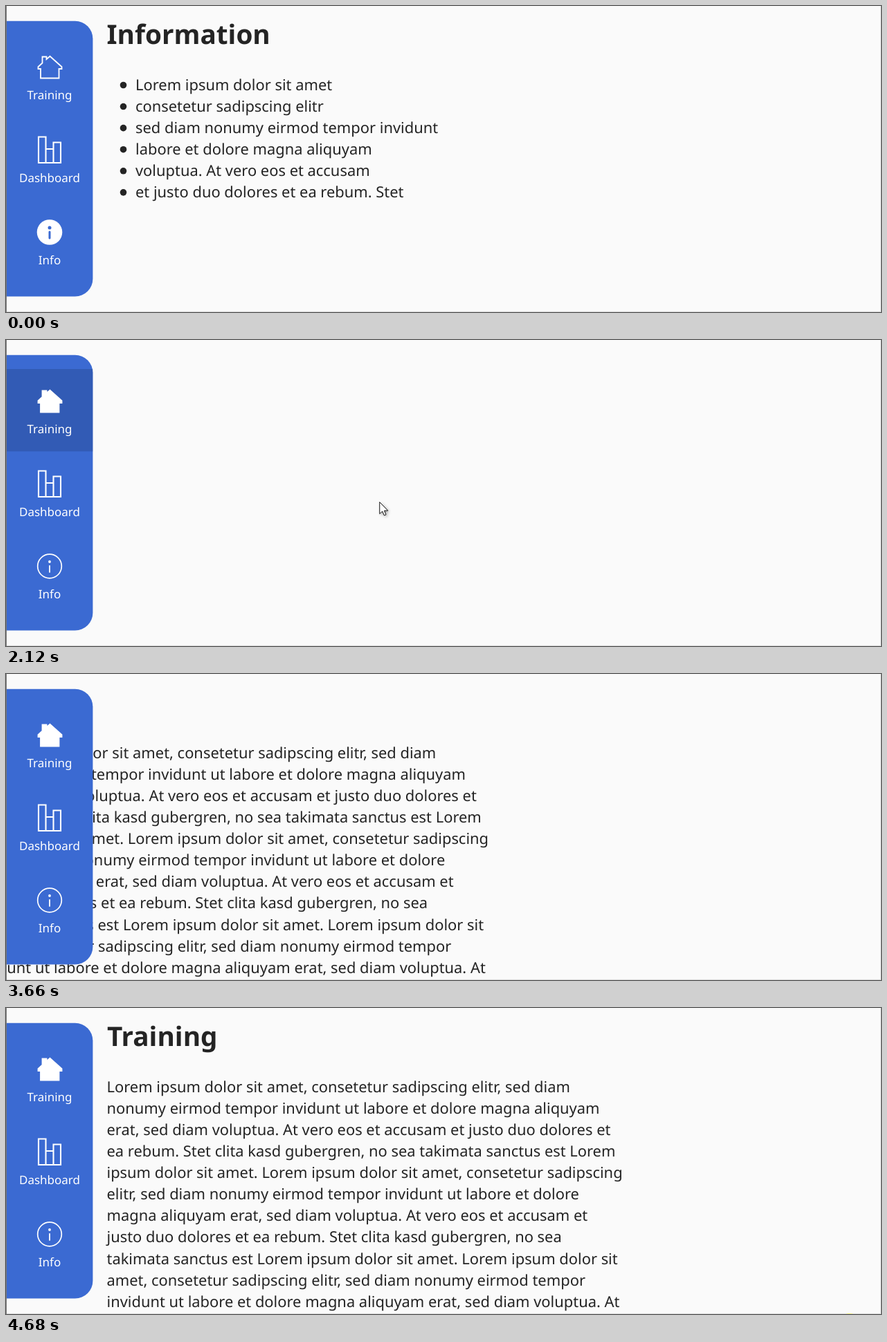
Animation of 1264 by 443 pixels, one loop 4.77 s. Source, as an HTML page with a canvas:

```html
<!DOCTYPE html>
<html lang="en">
<head>
<meta charset="utf-8">
<title>Sliding pages</title>
<style>
html, body { margin: 0; width: 100%; height: 100%; overflow: hidden; background: #fafafa; }
canvas { display: block; }
</style>
</head>
<body>
<canvas id="stage" width="1264" height="443"></canvas>
<script>
const ctx = document.getElementById('stage').getContext('2d');
const W = 1264, H = 443, LOOP = 4770;
const BLUE = '#3b6ad2', DARK = [34, 63, 124], INK = '#242424', CLICK = 'rgba(255,255,0,.47)';
const FONT = '"Noto Sans", "Open Sans", sans-serif';
const TITLE = 38.7, BODY = 21.9, LABEL = 17;
const SWAP = 1450, ENTER = 2782, SETTLED = 4280, TRAVEL = 952;
const HOME = [59, 83];

const facts = [
  'Lorem ipsum dolor sit amet',
  'consetetur sadipscing elitr',
  'sed diam nonumy eirmod tempor invidunt',
  'labore et dolore magna aliquyam',
  'voluptua. At vero eos et accusam',
  'et justo duo dolores et ea rebum. Stet'
];
const lesson = [
  'Lorem ipsum dolor sit amet, consetetur sadipscing elitr, sed diam',
  'nonumy eirmod tempor invidunt ut labore et dolore magna aliquyam',
  'erat, sed diam voluptua. At vero eos et accusam et justo duo dolores et',
  'ea rebum. Stet clita kasd gubergren, no sea takimata sanctus est Lorem',
  'ipsum dolor sit amet. Lorem ipsum dolor sit amet, consetetur sadipscing',
  'elitr, sed diam nonumy eirmod tempor invidunt ut labore et dolore',
  'magna aliquyam erat, sed diam voluptua. At vero eos et accusam et',
  'justo duo dolores et ea rebum. Stet clita kasd gubergren, no sea',
  'takimata sanctus est Lorem ipsum dolor sit amet. Lorem ipsum dolor sit',
  'amet, consetetur sadipscing elitr, sed diam nonumy eirmod tempor',
  'invidunt ut labore et dolore magna aliquyam erat, sed diam voluptua. At'
];

const house = new Path2D('M46.5 88 L52.5 82.5 V73.5 H58.5 V77 L63.5 72.8 L80.5 88 V91 H76.5 V104.5 H50 V91 H46.5 Z');
const bars = new Path2D('M47 189.5 H57.5 V227 H47 Z M57.5 207 H68.5 V227 H57.5 Z M68.5 197.5 H79 V227 H68.5 Z');
const arrow = new Path2D('M0 0 V17 L4 13.3 L6.6 19.3 L9.2 18.2 L6.7 12.4 H12 Z');
const hand = new Path2D('M-2 1.5 Q0 -1.2 2.2 1.5 V9 Q5 7.6 6.2 9.8 Q9 8.7 9.9 11.2 Q13 10.7 13 14 V18 Q12.6 21.5 10.5 25.5 H0.5 Q-1 21.5 -4 18.6 Q-7.4 14.6 -6 12.8 Q-4.3 11.3 -2 14.2 Z');
const fingers = new Path2D('M2.2 9 V14 M6.2 10 V14.5 M9.9 11.5 V15');

const clamp = v => Math.max(0, Math.min(1, v));
const smooth = v => { v = clamp(v); return v * v * (3 - 2 * v); };

function text(str, x, y, size, color, weight = 400) {
  ctx.font = `${weight} ${size}px ${FONT}`;
  ctx.fillStyle = color;
  ctx.fillText(str, x, y);
}

function disc(x, y, r, color) {
  ctx.fillStyle = color;
  ctx.beginPath();
  ctx.arc(x, y, r, 0, Math.PI * 2);
  ctx.fill();
}

const rowY = i => 122 + i * 31.07;

function drawInfoPage() {
  text('Information', 145.5, 55, TITLE, INK, 700);
  facts.forEach((line, i) => {
    disc(169.5, rowY(i) - 7.5, 4.8, INK);
    text(line, 187, rowY(i), BODY, INK);
  });
}

function drawTrainingPage(dx) {
  text('Training', 146 + dx, 55, TITLE, INK, 700);
  lesson.forEach((line, i) => text(line, 145.5 + dx, rowY(i), BODY, INK));
}

function pageOffset(t) {
  if (t < ENTER) return -Math.pow(0.2137 * Math.max(0, t - 1424), 1.4);
  const u = clamp((t - ENTER) / (SETTLED - ENTER));
  return -TRAVEL * (1 - Math.sin(u * Math.PI / 2));
}

function drawSidebar(onTraining, hover) {
  ctx.fillStyle = BLUE;
  ctx.beginPath();
  ctx.roundRect(0, 21.7, 125.4, 398.8, [0, 25.5, 25.5, 0]);
  ctx.fill();
  if (hover > 0) {
    ctx.fillStyle = `rgba(${DARK},${hover})`;
    ctx.fillRect(0, 42, 125.4, 119.3);
  }

  ctx.strokeStyle = ctx.fillStyle = '#fff';
  ctx.lineWidth = 1.8;
  if (onTraining) ctx.fill(house);
  ctx.stroke(house);
  ctx.lineWidth = 2.1;
  ctx.stroke(bars);

  if (onTraining) {
    ctx.lineWidth = 1.7;
    ctx.beginPath();
    ctx.arc(63, 327.5, 17.3, 0, Math.PI * 2);
    ctx.stroke();
  } else {
    disc(63, 327.5, 18.3, '#fff');
  }
  const mark = onTraining ? '#fff' : BLUE;
  disc(63, 321, onTraining ? 1.9 : 2.5, mark);
  ctx.strokeStyle = mark;
  ctx.lineWidth = onTraining ? 1.8 : 3;
  ctx.lineCap = 'round';
  ctx.beginPath();
  ctx.moveTo(63, 327);
  ctx.lineTo(63, 336);
  ctx.stroke();
  ctx.lineCap = 'butt';

  ctx.textAlign = 'center';
  ['Training', 'Dashboard', 'Info'].forEach((s, i) => text(s, 63, 135.3 + i * 119.2, LABEL, '#fff'));
  ctx.textAlign = 'left';
}

function pointer(t) {
  const move = (a, b, u) => a.map((v, i) => v + (b[i] - v) * smooth(u));
  if (t < 260 || t >= 2410) return null;
  if (t < 1900) return move([1077, 430], HOME, (t - 250) / 550);
  return move(HOME, [1178, 436], (t - 1890) / 510);
}

function drawPointer([x, y]) {
  const isHand = x < 125;
  const shape = isHand ? hand : arrow;
  ctx.save();
  ctx.translate(x, y);
  ctx.save();
  ctx.shadowColor = 'rgba(0,0,0,.4)';
  ctx.shadowBlur = 4;
  ctx.shadowOffsetX = ctx.shadowOffsetY = 2;
  ctx.fillStyle = '#fff';
  ctx.fill(shape);
  ctx.restore();
  ctx.strokeStyle = '#111';
  ctx.lineWidth = 1;
  ctx.stroke(shape);
  if (isHand) ctx.stroke(fingers);
  ctx.restore();
}

function draw(t) {
  const onTraining = t >= SWAP;
  ctx.textRendering = 'geometricPrecision';
  ctx.fillStyle = '#fafafa';
  ctx.fillRect(0, 0, W, H);

  if (onTraining) drawTrainingPage(pageOffset(t));
  else drawInfoPage();

  const hover = smooth((t - 690) / 200) * (1 - smooth((t - 2000) / 200));
  drawSidebar(onTraining, hover);

  ctx.fillStyle = '#dedede';
  ctx.fillRect(0, H - 1, W, 1);
  ctx.fillRect(W - 1, 0, 1, H);
  ctx.fillStyle = '#777';
  ctx.fillRect(0, 0, 1, H);

  if (t >= 1350 && t < SWAP) disc(...HOME, 16, CLICK);
  if (t >= 4680) disc(1218.5, 458, 16, CLICK);
  const at = pointer(t);
  if (at) drawPointer(at);
}

const start = performance.now();
function tick() {
  draw((performance.now() - start) % LOOP);
  requestAnimationFrame(tick);
}
tick();
</script>
</body>
</html>
```
